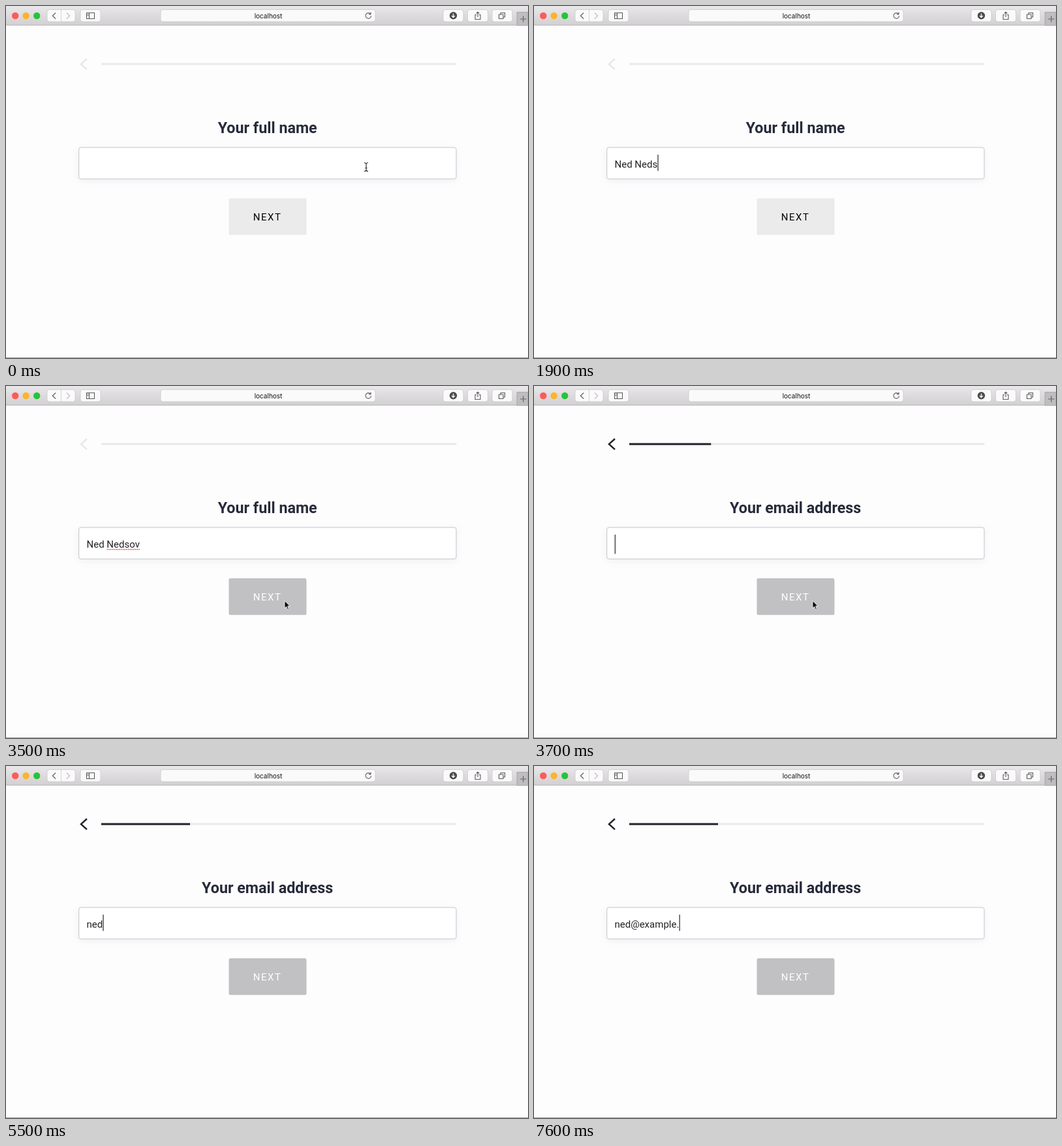
Write an HTML page that moves like this. It is 800 by 540 pixels and loops after 8000 ms.

```html
<!DOCTYPE html>
<html lang="en">
<head>
<meta charset="utf-8">
<title>Step form</title>
<style>
  html, body { margin: 0; width: 100%; height: 100%; overflow: hidden; background: #fefdfe; }
  svg { display: block; width: 800px; height: 540px; }
  text { font-family: Roboto, sans-serif; white-space: pre; }
  .line { fill: none; stroke: #5a5a5a; stroke-width: 1.1; }
  .key { fill: #fbfafb; stroke: #cbc9cb; stroke-width: .8; }
  #title { font-size: 23.3px; font-weight: 700; fill: #262b3a; text-anchor: middle; }
  #typed { font-size: 15px; fill: #222226; }
  #label { font-size: 15px; letter-spacing: 1.6px; }
  #field { fill: #fff; stroke: #c5c4c9; filter: drop-shadow(0 3px 6px rgba(40, 40, 70, .07)); }
</style>
</head>
<body>
<svg viewBox="0 0 800 540">
  <defs>
    <linearGradient id="bar" x2="0" y2="1">
      <stop stop-color="#e9e7e9"/><stop offset="1" stop-color="#d1cfd1"/>
    </linearGradient>
  </defs>
  <rect width="800" height="540" fill="#fefdfe"/>

  <!-- browser toolbar -->
  <rect width="800" height="30" fill="url(#bar)"/>
  <path d="M0 29.5H800" stroke="#b9b7b9"/>
  <circle cx="14.2" cy="15" r="5.2" fill="#fc5b57"/>
  <circle cx="30.6" cy="15" r="5.2" fill="#fdb32a"/>
  <circle cx="47.2" cy="15" r="5.2" fill="#27c33c"/>
  <g class="key">
    <rect x="63" y="5.5" width="43" height="18.5" rx="3.5"/>
    <path d="M84.5 5.5V24"/>
    <rect x="114" y="5.5" width="31" height="18.5" rx="3.5"/>
    <rect x="237" y="5.5" width="329" height="18.5" rx="3.5"/>
    <rect x="670" y="5.5" width="31" height="18.5" rx="3.5"/>
    <rect x="707.5" y="5.5" width="31" height="18.5" rx="3.5"/>
    <rect x="745" y="5.5" width="31" height="18.5" rx="3.5"/>
  </g>
  <g class="line">
    <path d="M76 10.5L71.3 15 76 19.5"/>
    <path d="M93 10.5L97.7 15 93 19.5" stroke="#bbb" style="stroke:#bbb"/>
    <path d="M123.5 10.5H135.5V19.5H123.5ZM127.5 10.5V19.5M124.5 12.7H126.5M124.5 14.7H126.5"/>
    <path d="M558.7 12.4A4.2 4.2 0 1 0 559.5 15M559 9.5V12.7H555.8"/>
    <path d="M721 13.5H719V20.5H727V13.5H725M723 17V9.5M720.7 11.5L723 9.2 725.3 11.5"/>
    <path d="M755.5 13H762V19.5H755.5ZM758 13V10.5H764.5V17H762"/>
  </g>
  <circle cx="685.5" cy="14.7" r="5.7" fill="#4b4b4b"/>
  <path d="M685.5 11.5V17M683 15L685.5 17.5 688 15" fill="none" stroke="#fff" stroke-width="1.3"/>
  <path d="M783 30V9.5H800V30Z" fill="#bfbdbf" stroke="#a3a1a3" stroke-width=".8"/>
  <path d="M788 20H797.5M792.7 15.2V24.8" stroke="#666" stroke-width="1.2"/>
  <text x="402" y="18.7" text-anchor="middle" style="font:10px Inter,sans-serif" fill="#111">localhost</text>

  <!-- form -->
  <path id="back" d="M124 81L115 89.2 124 97.4" fill="none" stroke-width="2.5"/>
  <rect x="146" y="87.6" width="544.5" height="3" rx="1" fill="#e9e8eb"/>
  <rect id="progress" x="146" y="87.6" height="3" fill="#22252b"/>
  <text id="title" x="400.7" y="194.7"></text>
  <rect id="field" x="111.7" y="217" width="578.3" height="48.3" rx="3"/>
  <text id="typed" x="123.5" y="247.6"></text>
  <path id="misspelt" fill="none" stroke="#e8483f" stroke-width="1.8" stroke-linecap="round" stroke-dasharray="0 2.7"/>
  <rect id="caret" y="228" width="1.2" fill="#26262a"/>
  <rect id="button" x="341.5" y="295" width="119" height="56.3" rx="2.5"/>
  <text id="label" x="378.7" y="329">NEXT</text>

  <g id="pointer">
    <path id="beam" d="M-3 -6.5Q0 -6.5 0 -4.5Q0 -6.5 3 -6.5M0 -5V5M-3 6.5Q0 6.5 0 4.5Q0 6.5 3 6.5M-1.5 1.5H1.5" fill="none" stroke="#222" stroke-width="1.1"/>
    <path id="arrow" d="M0 0V11.5L2.7 9 4.5 13.2 6.4 12.4 4.6 8.3H8.2Z" fill="#000" stroke="#fff" stroke-width=".9"/>
  </g>
  <path d="M0 539.5H800" stroke="#a09ea0"/>
</svg>
<script>
const LOOP = 8000, STEP = 100, SUBMIT = 3600;
const NAME = "Ned Nedsov", EMAIL = "ned@example.";
const NAME_KEYS = [200, 400, 700, 1000, 1200, 1500, 1700, 1900, 2100, 2400];
const EMAIL_KEYS = [5000, 5200, 5500, 5900, 6200, 6400, 6700, 6800, 7000, 7200, 7400, 7600];
// time, x, y
const POINTER_PATH = [
  [0, 552, 247], [2700, 552, 247], [2800, 578, 250], [2900, 561, 270], [3000, 522, 304],
  [3100, 472, 325], [3200, 440, 332], [3300, 430, 330.5], [3500, 427, 329.5], [LOOP, 427, 329.5]
];

const el = Object.fromEntries([...document.querySelectorAll("[id]")].map(e => [e.id, e]));
const set = (e, attrs) => Object.entries(attrs).forEach(([k, v]) => e.setAttribute(k, v));
const show = (e, on) => set(e, { visibility: on ? "inherit" : "hidden" });
const ramp = (t, from, to) => Math.min(1, Math.max(0, (t - from) / (to - from)));
const mix = (a, b, p) => a + (b - a) * p;
const blend = (a, b, p) => `rgb(${a.map((v, i) => Math.round(mix(v, b[i], p)))})`;

function pointerAt(t) {
  const i = Math.max(1, POINTER_PATH.findIndex(p => p[0] >= t));
  const [t0, x0, y0] = POINTER_PATH[i - 1], [t1, x1, y1] = POINTER_PATH[i];
  const p = ramp(t, t0, t1);
  return [mix(x0, x1, p), mix(y0, y1, p)];
}

function caretVisible(t) {
  if (t < SUBMIT) return t >= 100 && t < 2900;
  return t < 4100 || t >= 4600;
}

function draw(t) {
  const second = t >= SUBMIT;
  const value = second ? EMAIL : NAME;
  const count = (second ? EMAIL_KEYS : NAME_KEYS).filter(k => k <= t).length;

  el.title.textContent = second ? "Your email address" : "Your full name";
  el.typed.textContent = value.slice(0, count);
  const width = count ? el.typed.getComputedTextLength() : 0;
  set(el.caret, { x: 123.7 + width, height: count ? 25 : 29.5 });
  show(el.caret, caretVisible(t));

  const checked = t >= 3500 && !second;
  show(el.misspelt, checked);
  if (checked) {
    const start = 124.5 + el.typed.getSubStringLength(0, NAME.indexOf(" ") + 1);
    set(el.misspelt, { d: `M${start} 250.7H${123.5 + width}` });
  }

  set(el.back, { stroke: blend([232, 231, 234], [31, 34, 40], ramp(t, 3500, 3700)) });
  set(el.progress, { width: 136 * (1 - (1 - ramp(t, 3500, 3850)) ** 3) });

  const hover = ramp(t, 3200, 3500);
  set(el.button, { fill: blend([236, 235, 236], [193, 192, 194], hover) });
  set(el.label, { fill: blend([0, 0, 0], [255, 255, 255], hover) });

  const overField = t <= 2800;
  set(el.pointer, { transform: `translate(${pointerAt(t)})` });
  show(el.pointer, t < 200 || (t >= 2800 && t < 5100));
  show(el.beam, overField);
  show(el.arrow, !overField);
}

const began = performance.now();
function tick() {
  const t = (performance.now() - began) % LOOP;
  draw(Math.floor(t / STEP) * STEP);
  requestAnimationFrame(tick);
}
tick();
</script>
</body>
</html>
```
